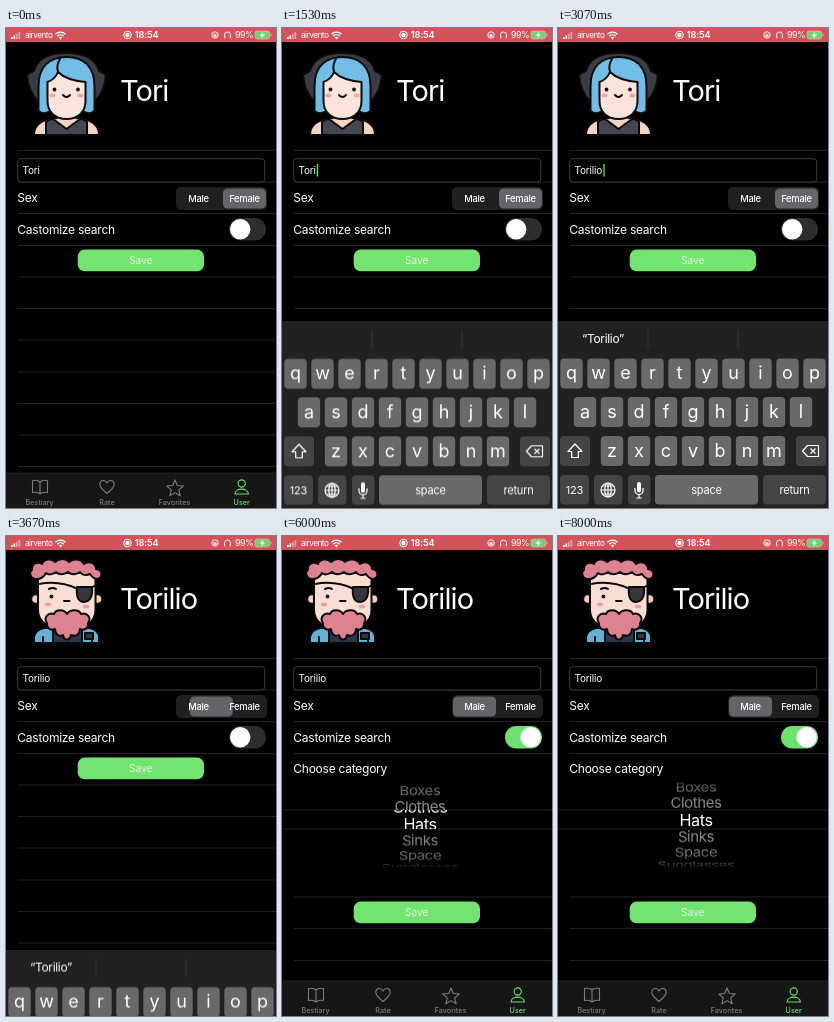
An HTML page that plays this animation: 270x480 px, repeating every 8.07 s.

```html
<!DOCTYPE html>
<html lang="en">
<head>
<meta charset="utf-8">
<title>Profile settings</title>
<style>
html, body { margin: 0; width: 100%; height: 100%; overflow: hidden; background: #000; }
body { position: relative; font-family: Inter, Roboto, sans-serif; }
svg { position: absolute; left: 0; top: 0; display: block; }
text { fill: #fff; white-space: pre; }
.mid { text-anchor: middle; }
.label { font-size: 12px; letter-spacing: -.25px; }
.line { fill: none; stroke: #272729; stroke-width: .9; }
.ink { stroke: #0b0b0d; stroke-width: 2; stroke-linejoin: round; stroke-linecap: round; }
.none { fill: none; }
.tab { fill: none; stroke: #7d7d80; stroke-width: 1.1; stroke-linejoin: round; }
.tabs text { font-size: 7.2px; font-weight: 500; fill: #7d7d80; text-anchor: middle; }
.key { fill: #69696a; }
.dark { fill: #444445; }
.key-text { font-size: 18px; text-anchor: middle; }
.key-name { font-size: 11px; text-anchor: middle; letter-spacing: -.2px; }
.hint { font-size: 12px; text-anchor: middle; letter-spacing: -.3px; }

/* One loop is 8070 ms, so 1% is 80.7 ms. */
.cut, .caret, .save { animation: 8070ms step-end infinite; }
.old { animation-name: old; }
.new { animation-name: new; }
.l { animation-name: type-l; }
.i { animation-name: type-i; }
.o { animation-name: type-o; }
.pop-l { animation-name: pop-l; }
.pop-i { animation-name: pop-i; }
.pop-o { animation-name: pop-o; }
.hints { animation-name: hints; }
.quoted { animation-name: quoted; }
.short { animation-name: short; }
.long { animation-name: long; }
.save { animation-name: save; }
.caret { animation-name: blink, step; }
.keyboard { animation: keyboard 8070ms cubic-bezier(.38,.7,.125,1) infinite; }
.thumb { animation: thumb 8070ms cubic-bezier(.3,.6,.3,1) infinite; }
.knob { animation: knob 8070ms linear infinite; }
.track { animation: track 8070ms linear infinite; }
@keyframes old { 0% { visibility: visible } 44.3%, 100% { visibility: hidden } }
@keyframes new { 0% { visibility: hidden } 44.3%, 100% { visibility: visible } }
@keyframes type-l { 0% { visibility: hidden } 27.7%, 100% { visibility: visible } }
@keyframes type-i { 0% { visibility: hidden } 32.2%, 100% { visibility: visible } }
@keyframes type-o { 0% { visibility: hidden } 36%, 100% { visibility: visible } }
@keyframes pop-l { 0%, 29.4%, 100% { visibility: hidden } 27.7% { visibility: visible } }
@keyframes pop-i { 0%, 33.9%, 100% { visibility: hidden } 32.2% { visibility: visible } }
@keyframes pop-o { 0%, 37.7%, 100% { visibility: hidden } 36% { visibility: visible } }
@keyframes hints { 0%, 36.4%, 100% { visibility: hidden } 27.8% { visibility: visible } }
@keyframes quoted { 0% { visibility: hidden } 36.4%, 100% { visibility: visible } }
@keyframes short { 0% { visibility: visible } 63.6%, 100% { visibility: hidden } }
@keyframes long { 0% { visibility: hidden } 63.6%, 100% { visibility: visible } }
@keyframes save { 0% { transform: none } 63.6%, 100% { transform: translateY(144px) } }
@keyframes blink {
  0%, 22.3%, 41%, 44.24%, 100% { opacity: 0 }
  16.7%, 25.8%, 43.5% { opacity: 1 }
}
@keyframes step {
  0% { transform: none } 27.7% { transform: translateX(2.4px) }
  32.2% { transform: translateX(4.8px) } 36%, 100% { transform: translateX(10.6px) }
}
@keyframes keyboard {
  0%, 14.56%, 49.15%, 100% { transform: translateY(187px) }
  19.51%, 44.2% { transform: none }
}
@keyframes thumb { 0%, 44.2% { transform: none } 47.9%, 100% { transform: translateX(-46px) } }
@keyframes knob {
  0%, 63.5% { transform: none } 64.44% { transform: translateX(5px) }
  66.6%, 100% { transform: translateX(14.5px) }
}
@keyframes track { 0%, 64.5% { fill: #2d2d30 } 66.4%, 100% { fill: #6ee06d } }
@keyframes spin {
  0%, 69.4% { transform: none }
  74.35% { transform: rotateX(30.4deg); animation-timing-function: ease-out }
  76.8%, 100% { transform: rotateX(34.4deg) }
}

.layer { position: absolute; left: 0; width: 270px; overflow: hidden; color: #fff; text-align: center; }
.far {
  top: 238px; height: 94px; font-size: 14.9px; letter-spacing: -.35px;
  -webkit-mask-image: var(--fade); mask-image: var(--fade);
  --fade: linear-gradient(transparent, #0006 14px, #0008 28px, #0009 36px, transparent 36px,
    transparent 55px, #0009 55px, #0008 64px, #0007 78px, #0004 90px, transparent);
}
.near { top: 274px; height: 19px; font-size: 16.2px; letter-spacing: -.4px; }
.wheel {
  position: absolute; left: 0; width: 270px; height: 0; margin-left: 2.6px;
  transform-style: preserve-3d; animation: spin 8070ms ease-in infinite;
}
.far .wheel { top: 46px; }
.near .wheel { top: 10px; }
.wheel span {
  position: absolute; left: 0; top: -10px; width: 100%; line-height: 20px;
  backface-visibility: hidden;
  transform: rotateX(calc(var(--i) * -17.2deg)) translateZ(57.5px);
}
</style>
</head>
<body>
<svg width="270" height="480" viewBox="0 0 270 480">
  <defs>
    <path id="bubble" class="key" d="M228 322H258Q264 322 264 328V352C264 360 254 360 254 368V395Q254 399 250 399H236Q232 399 232 395V368C232 360 222 360 222 352V328Q222 322 228 322Z"/>
  </defs>
  <rect width="270" height="480"/>

  <!-- status bar -->
  <rect width="270" height="14" fill="#d2535a"/>
  <g fill="#fff">
    <path d="M5 9h1.7v2H5zM7.5 7.5h1.7V11H7.5z"/>
    <path d="M10 5.7h1.7V11H10zM12.5 4h1.7v7h-1.7z" opacity=".45"/>
    <path d="M54.5 11.5l-1.7-2a2.5 2.5 0 0 1 3.4 0z"/>
  </g>
  <g class="none" stroke="#fff" stroke-width="1.3">
    <path d="M49.5 6.2a7.2 7.2 0 0 1 10 0M51.3 8.2a4.6 4.6 0 0 1 6.4 0"/>
    <circle cx="121.5" cy="7" r="3.8" stroke-width="1"/>
    <g stroke-width=".9">
      <circle cx="209" cy="7" r="3.2"/>
      <path d="M218.5 9V7a3 3 0 0 1 6 0v2M218.8 8v2.5M224.2 8v2.5"/>
    </g>
  </g>
  <circle cx="121.5" cy="7" r="2.2" fill="#fff"/>
  <rect x="207.5" y="6.3" width="3" height="2.5" fill="#fff"/>
  <text x="19" y="10.2" font-size="8.3" letter-spacing="-.55">airvento</text>
  <text class="mid" x="140.7" y="10.4" font-size="9.2" font-weight="600" letter-spacing="-.15">18:54</text>
  <text x="229" y="10.3" font-size="8.8" letter-spacing="-.4">99%</text>
  <rect x="249" y="3" width="14.5" height="8" rx="2" fill="#72d173" stroke="#eeb0b0" stroke-width=".7"/>
  <path d="M257.5 3.5l-4 4.2h2.6l-1 3 4-4.2h-2.6z" fill="#fff"/>
  <rect x="264.5" y="5.5" width="1" height="3" rx=".5" fill="#eeb0b0"/>

  <!-- woman -->
  <g class="cut old ink">
    <path fill="#3b3d43" d="M60.500 25C42 25 31 32 28 43L21 47C22 58 25 67 33 74H88C96 67 99 58 100 47L93 43C90 32 79 25 60.500 25Z"/>
    <path fill="#f7d3c1" d="M28 107C28 97 36 91 51 90V80H70V90C85 91 93 97 93 107Z"/>
    <path fill="#45474e" d="M40 107V94Q43 91 47 91L60.500 101L74 91Q78 91 81 94V107Z"/>
    <path fill="#72bde6" d="M32.500 83V58C32.500 39 43 29 60.500 29S88.500 39 88.500 58V83Q84 87 78 84H43Q37 87 32.500 83Z"/>
    <path fill="#fce4da" d="M41.500 54C47 52 50 49 52 44C58 50 69 53 79.500 54V73C79.500 85 71 91 60.500 91S41.500 85 41.500 73Z"/>
    <path class="none" d="M52 44Q50 37 54 31M57 67q3.500 4 7 0"/>
    <g stroke="none">
      <circle cx="48.500" cy="61.500" r="1.900" fill="#111"/><circle cx="72" cy="61.500" r="1.900" fill="#111"/>
      <ellipse cx="46.500" cy="67.500" rx="3" ry="1.900" fill="#f3a4a4"/><ellipse cx="74.500" cy="67.500" rx="3" ry="1.900" fill="#f3a4a4"/>
    </g>
  </g>

  <!-- man -->
  <g class="cut new ink">
    <path fill="#66b0d6" d="M28 107V101Q29 94 38 92H84Q92 94 93 100V107Z"/>
    <path fill="#2c3646" d="M47 92H76V107H47ZM79 97h8v6h-8z"/>
    <path class="none" d="M37 101v6M86 103v4"/>
    <circle cx="30" cy="63" r="4.800" fill="#f4cdbd"/><circle cx="91.500" cy="63" r="4.800" fill="#f4cdbd"/>
    <path fill="#f9dfd3" d="M32 37H89.500V74C89.500 87 78 93 61 93S32 87 32 74Z"/>
    <path fill="#dd8291" d="M31 43C25 43 22 37 26 34C25 28 31 25 36 28C38 23 45 22 49 26C53 22 60 22 63 26C68 22 75 23 78 28C84 24 90 28 90 33C97 34 97 42 91 43C88 43 86 41 84 38C80 40 76 39 74 36C70 39 65 39 62 36C58 39 53 39 50 36C46 39 42 39 40 37C38 41 35 43 31 43Z"/>
    <path class="none" d="M33 48Q53 44 72 53M85 52L90 49"/>
    <path fill="#35363c" d="M71 51H86C87 60 84 66 78 66S70 60 71 51Z"/>
    <path fill="#dd8291" d="M61 78C58 73 50 73 48 78C42 76 37 82 41 87C40 92 45 95 49 93C49 99 54 101 57 99C58 105 64 105 65 99C69 101 74 99 74 93C78 95 83 92 82 87C86 82 81 76 75 78C73 73 64 73 61 78Z"/>
    <path class="none" d="M43 53q4-2 7 0M58 65h5.500"/>
    <g stroke="none">
      <circle cx="45.500" cy="60.500" r="1.900" fill="#111"/>
      <ellipse cx="42" cy="68.500" rx="3.300" ry="1.900" fill="#f0a0a2"/><ellipse cx="80" cy="70.500" rx="3.300" ry="1.900" fill="#f0a0a2"/>
    </g>
  </g>
  <text x="114" y="73" font-size="29" letter-spacing="-.9">Tori<tspan class="cut new">lio</tspan></text>

  <!-- form -->
  <path class="line" d="M12 122.500H270M12 154H270M12 185.500H270M12 217.500H270"/>
  <path class="line cut short" d="M12 249H270M12 280.500H270M12 312H270M12 344H270M12 375.500H270M12 407H270M12 438.500H270"/>
  <path class="line cut long" d="M12 361H270M12 392.500H270M12 424.500H270"/>
  <path class="line cut long" d="M0 274H270M0 293H270"/>
  <rect x="11.700" y="130.700" width="247" height="23.300" rx="3" stroke="#434346" stroke-width=".9"/>
  <text x="16.500" y="146.200" font-size="10" letter-spacing="-.2">Tori<tspan class="cut l">l</tspan><tspan class="cut i">i</tspan><tspan class="cut o">o</tspan></text>
  <rect class="caret" x="34.700" y="136" width="1.400" height="12.500" fill="#6ee06d"/>
  <text class="label" x="11.300" y="174">Sex</text>
  <rect x="170" y="159" width="91" height="23" rx="5" fill="#202023"/>
  <rect class="thumb" x="217" y="160.500" width="43" height="20" rx="4.500" fill="#656569"/>
  <g class="mid" font-size="9.400" font-weight="500" letter-spacing="-.25">
    <text x="192.500" y="174">Male</text><text x="238.500" y="174">Female</text>
  </g>
  <text class="label" x="11.300" y="205.500">Castomize search</text>
  <rect class="track" x="223" y="190" width="37" height="22.500" rx="11.250" fill="#2d2d30"/>
  <circle class="knob" cx="234.200" cy="201.200" r="10.200" fill="#fff"/>
  <text class="label cut long" x="11.300" y="237">Choose category</text>
  <g class="save">
    <rect x="71.700" y="221.600" width="126.300" height="21.600" rx="7" fill="#74e470"/>
    <text class="mid" x="134.800" y="236.200" font-size="10.300" font-weight="300">Save</text>
  </g>

  <!-- tab bar -->
  <rect y="445" width="270" height="35" fill="#161617"/>
  <path class="line" d="M0 445H270"/>
  <g class="tabs">
    <path class="tab" d="M34 454C32 452 29 452 26.500 452.500V464.500C29 464 32 464 34 466C36 464 39 464 41.500 464.500V452.500C39 452 36 452 34 454V466"/>
    <path class="tab" d="M101 465.500C96 461.500 93.800 459 93.800 456.300C93.800 452 99 451 101 455C103 451 108.200 452 108.200 456.300C108.200 459 106 461.500 101 465.500Z"/>
    <path class="tab" d="M169 452l2.300 5.500 6 .5-4.600 3.900 1.500 5.900-5.200-3.200-5.200 3.200 1.500-5.900-4.600-3.900 6-.5z"/>
    <g class="tab" style="stroke:#6ee06d">
      <circle cx="235.700" cy="455.500" r="3.600"/>
      <path d="M229 466C229 459.500 242.400 459.500 242.400 466Z"/>
    </g>
    <text x="33.500" y="477">Bestiary</text>
    <text x="101" y="477">Rate</text>
    <text x="168.500" y="477">Favorites</text>
    <text x="235.700" y="477" style="fill:#6ee06d">User</text>
  </g>

  <g class="keyboard">
    <rect y="293" width="270" height="190" fill="#212121"/>
    <path class="line" style="stroke:#3c3c3e" d="M90 302V320M180 302V320"/>
    <g class="cut hints"><text class="hint" x="45" y="315">Toril</text><text class="hint" x="135" y="315">Torrents</text></g>
    <text class="hint cut quoted" x="45" y="315">“Torilio”</text>
    <g id="letters"></g>
    <g class="dark">
      <rect x="2" y="408" width="30" height="30" rx="4"/><rect x="238" y="408" width="30" height="30" rx="4"/>
      <rect x="2" y="447" width="29" height="29.500" rx="4"/><rect x="36" y="447" width="28.500" height="29.500" rx="4"/>
      <rect x="70" y="447" width="22.500" height="29.500" rx="4"/><rect x="205" y="447" width="63" height="29.500" rx="4"/>
    </g>
    <rect class="key" x="97" y="447" width="103" height="29.500" rx="4"/>
    <g class="none" stroke="#fff" stroke-width="1.200" stroke-linejoin="round">
      <path d="M17 416l-7 7.500h3.700v6h6.600v-6H24z"/>
      <path d="M244.500 423l5-5.500h11v11h-11zM252.500 420.500l5 5M257.500 420.500l-5 5"/>
      <circle cx="50" cy="462" r="7"/><ellipse cx="50" cy="462" rx="3.200" ry="7"/>
      <path d="M43 462H57M50 455V469M44.500 458H55.500M44.500 466H55.500"/>
      <path d="M77 460v2.500a4 4 0 0 0 8 0V460M81 467v3M78.500 470h5"/>
    </g>
    <rect x="79" y="454" width="4" height="10.500" rx="2" fill="#fff"/>
    <text class="key-name" x="16.500" y="466">123</text>
    <text class="key-name" x="148.500" y="465.500">space</text>
    <text class="key-name" x="236.500" y="465.500">return</text>
    <g class="cut pop-l"><use href="#bubble"/><text class="mid" x="243" y="351" font-size="27">l</text></g>
    <g class="cut pop-i" transform="translate(-41 -38.500)"><use href="#bubble"/><text class="mid" x="243" y="351" font-size="27">i</text></g>
    <g class="cut pop-o" transform="translate(-14 -38.500)"><use href="#bubble"/><text class="mid" x="243" y="351" font-size="27">o</text></g>
  </g>
</svg>
<div class="layer far cut long"><div class="wheel"></div></div>
<div class="layer near cut long"><div class="wheel"></div></div>
<script>
const rows = [["qwertyuiop", 13.5, 330.5], ["asdfghjkl", 27, 369], ["zxcvbnm", 54, 408]];
document.getElementById("letters").innerHTML = rows.map(([keys, left, y]) =>
  [...keys].map((key, i) => {
    const x = left + i * 27;
    return `<rect class="key" x="${x - 11.2}" y="${y}" width="22.4" height="30" rx="4"/>` +
      `<text class="key-text" x="${x}" y="${y + 20.5}">${key}</text>`;
  }).join("")).join("");

const items = ["Boxes", "Clothes", "Hats", "Sinks", "Space", "Sunglasses"];
for (const wheel of document.querySelectorAll(".wheel"))
  wheel.innerHTML = items.map((item, i) => `<span style="--i:${i}">${item}</span>`).join("");
</script>
</body>
</html>
```
